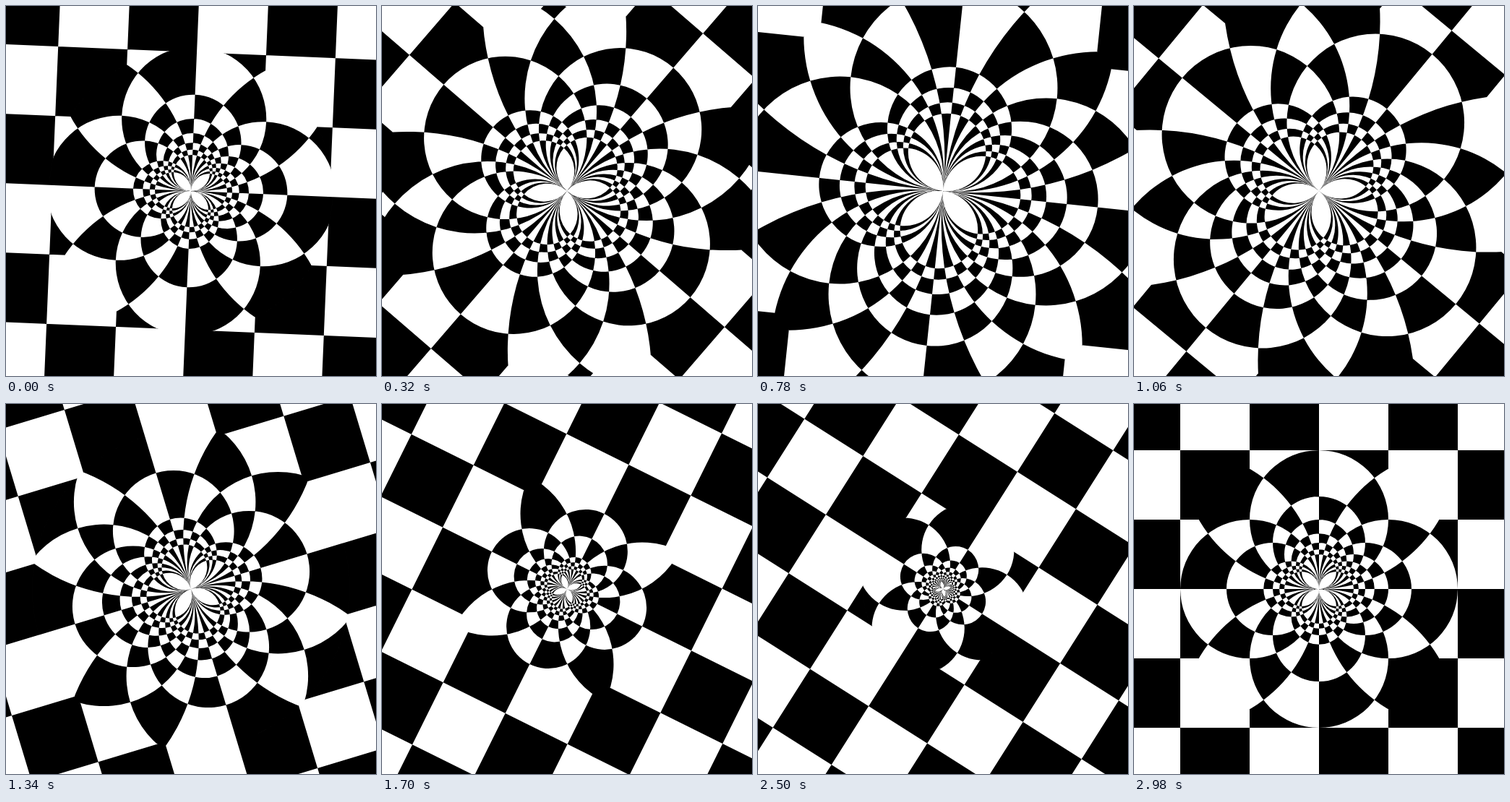
An HTML page with a canvas for the animation above (3000 ms loop, 512 by 512 pixels).

```html
<!DOCTYPE html>
<html lang="en">
<head>
<meta charset="utf-8">
<title>Inverted checkerboard</title>
<style>
html, body { margin: 0; width: 100%; height: 100%; overflow: hidden; background: #fff; }
canvas { display: block; width: 512px; height: 512px; }
</style>
</head>
<body>
<canvas id="stage" width="512" height="512"></canvas>
<script>
const SIZE = 512, CELL = 96, FAR = 1000, STEP = 20, STEPS = 150;
const ctx = document.getElementById('stage').getContext('2d');

// Grid lines run from -8 to 8; one is left out on each axis
const LINES = Array.from({ length: 17 }, (_, i) => i - 8).filter(k => k !== -4);

// The side of each grid line that faces away from the center
function halfPlane(path, k) {
  const far = k < 0 ? -FAR : FAR;
  path.rect(k * CELL, -FAR, far, 2 * FAR);
  path.rect(-FAR, k * CELL, 2 * FAR, far);
}

// The same area after inversion in a circle of the given radius
function inverted(path, k, radius) {
  if (k === 0) return halfPlane(path, k);
  const d = radius * radius / (2 * CELL * k), r = Math.abs(d);
  path.moveTo(d + r, 0);
  path.arc(d, 0, r, 0, 2 * Math.PI);
  path.moveTo(r, d);
  path.arc(0, d, r, 0, 2 * Math.PI);
}

function board(add, radius) {
  const path = new Path2D();
  for (const k of LINES) add(path, k, radius);
  ctx.fill(path, 'evenodd');
}

function draw(step) {
  const angle = (step + 1) / STEPS * 2 * Math.PI;
  const radius = CELL * (2 + Math.sin(angle));
  const disc = new Path2D();
  disc.arc(0, 0, radius, 0, 2 * Math.PI);

  ctx.clearRect(0, 0, SIZE, SIZE);
  ctx.save();
  ctx.translate(SIZE / 2, SIZE / 2);
  ctx.rotate(angle);
  ctx.scale(1, -1);
  board(halfPlane);
  ctx.globalCompositeOperation = 'destination-out';
  ctx.fill(disc);
  // Adding coverage keeps the rim of the disc free of a seam
  ctx.globalCompositeOperation = 'lighter';
  ctx.clip(disc);
  board(inverted, radius);
  ctx.restore();
}

let shown = -1;
function tick() {
  const step = Math.floor(performance.now() / STEP) % STEPS;
  if (step !== shown) draw(shown = step);
  requestAnimationFrame(tick);
}
tick();
</script>
</body>
</html>
```
